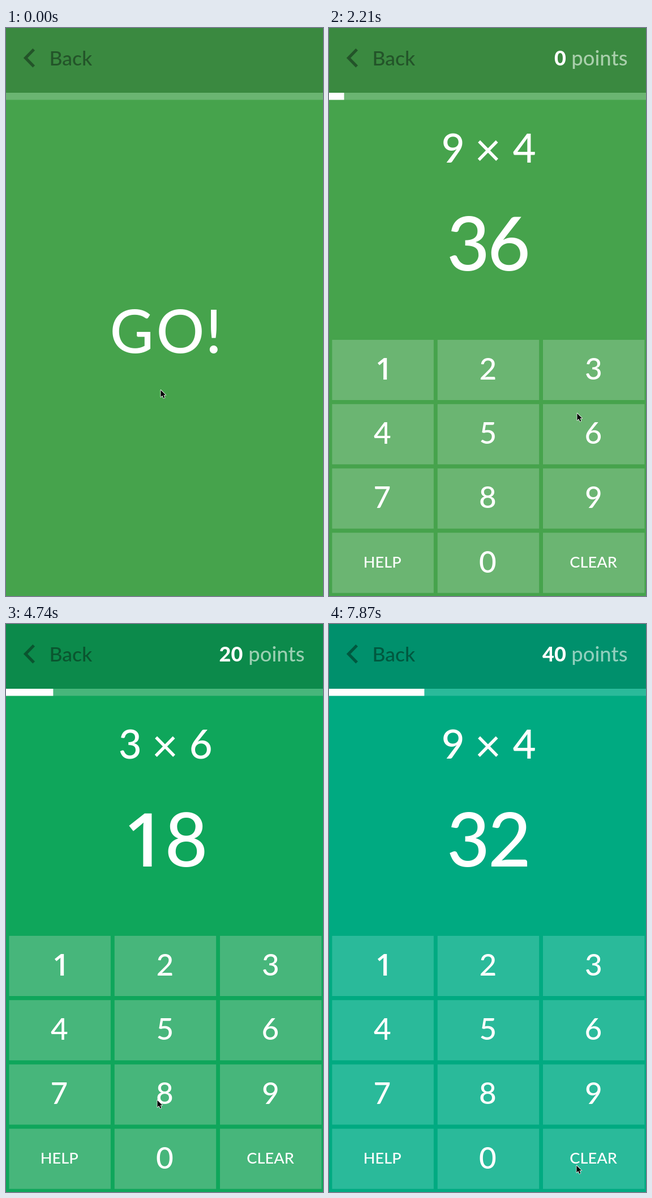
Animation, 560 px wide and 1000 px high, one loop 8000 ms. Source, as an HTML page:

```html
<!DOCTYPE html>
<html lang="en">
<head>
<meta charset="utf-8">
<title>Times tables</title>
<style>
html, body { margin: 0; width: 100%; height: 100%; overflow: hidden; }
svg { display: block; width: 100%; height: 100%; }
text { fill: #fff; white-space: pre; }
#bg { fill: var(--bg); }
#head { fill: var(--head); }
.panel { fill: var(--panel); }
#back text { fill: var(--back); }
#back path { fill: none; stroke: var(--back); stroke-width: 5.2; }
#label text { fill: var(--label); }
</style>
</head>
<body>
<svg id="stage" viewBox="0 0 560 1000" xmlns="http://www.w3.org/2000/svg">
  <rect id="bg" width="560" height="1000"/>
  <rect id="head" width="560" height="114"/>
  <rect class="panel" y="114" width="560" height="12.5"/>
  <rect id="bar" y="114" width="0" height="12.5" fill="#fff"/>
  <g id="back"><path d="M49.2 37.8L34.5 52.8 49.2 67.8"/></g>
  <g id="go"></g>
  <g id="game">
    <g id="score"></g>
    <g id="label"></g>
    <g id="question"></g>
    <g id="answer"></g>
    <g id="keys"></g>
  </g>
  <path id="cursor" d="M.4 .4V12.8L3.3 10.1 5.3 14.8 7.4 13.9 5.5 9.3H9.2Z" fill="#000" stroke="#fff" stroke-width="1.5" stroke-linejoin="round" paint-order="stroke"/>
</svg>
<script>
const LOOP = 8000;
const $ = id => document.getElementById(id);
const ctx = document.createElement('canvas').getContext('2d');

function add(parent, tag, attrs) {
  const el = document.createElementNS('http://www.w3.org/2000/svg', tag);
  for (const k in attrs) el.setAttribute(k, attrs[k]);
  parent.append(el);
  return el;
}

// The figure one comes from a family that draws it without a foot.
const face = (str, weight) => str === '1'
  ? { family: '"Open Sans", sans-serif', weight: weight + 100 }
  : { family: 'Lato, sans-serif', weight };

function measure(str, size, f) {
  ctx.font = `${f.weight} ${size}px ${f.family}`;
  const m = ctx.measureText(str);
  return { l: m.actualBoundingBoxLeft, r: m.actualBoundingBoxRight,
    a: m.actualBoundingBoxAscent, d: m.actualBoundingBoxDescent };
}

// Text whose visible ink is centred on cx.
function put(parent, str, cx, base, size, weight = 500) {
  const f = face(str, weight), m = measure(str, size, f);
  add(parent, 'text', {
    x: cx - (m.r - m.l) / 2, y: base, 'font-size': size,
    'font-weight': f.weight, 'font-family': f.family
  }).textContent = str;
}

function putTimes(parent, cx, cy, width) {
  const m = measure('×', 100, face('×', 400)), k = width / (m.r + m.l);
  put(parent, '×', cx, cy + (m.a - m.d) / 2 * k, 100 * k, 400);
}

put($('back'), 'Back', 116.3, 65.5, 35.5);
put($('label'), 'points', 478.5, 65.5, 36.4);
[['G', 221.5], ['O', 308], ['!', 367]].forEach(([c, x]) => put($('go'), c, x, 572, 106));

['1', '2', '3', '4', '5', '6', '7', '8', '9', 'HELP', '0', 'CLEAR'].forEach((name, i) => {
  const col = i % 3, row = Math.floor(i / 3), word = name.length > 1;
  add($('keys'), 'rect', {
    class: 'panel', x: 5.5 + 186.25 * col, y: 549 + 113.2 * row, width: 179.4, height: 106
  });
  put($('keys'), name, 94 + 186.5 * col + (word ? 1 : 0),
    (word ? 610.8 : 619) + 113.2 * row, word ? 27.2 : 53);
});

const rounds = [
  { at: 0, points: '0', a: '9', b: '4',
    bg: '#46a34c', head: '#3a8940', panel: '#6bb572', back: '#235429', label: '#a9cfab' },
  { at: 2360, points: '20', a: '3', b: '6',
    bg: '#0fa65b', head: '#0c8a4b', panel: '#47b67b', back: '#0a552f', label: '#9acfb1' },
  { at: 4880, points: '40', a: '9', b: '4',
    bg: '#00aa81', head: '#00906c', panel: '#2aba9a', back: '#00583f', label: '#90cfbd' }
];

const answers = [[0, ''], [1630, '3'], [2070, '36'], [2360, ''], [3840, '1'],
  [4580, '18'], [4880, ''], [6070, '3'], [6520, '32']];

const path = [[740, 273, 637], [1500, 438, 616], [1770, 438, 618], [2140, 438, 678],
  [2660, 438, 678], [3780, 134, 615], [4200, 134, 615], [4700, 267, 838],
  [4880, 267, 838], [5950, 456, 613], [6070, 456, 613], [6500, 283, 617],
  [7420, 283, 617], [7860, 437, 953]];

function cursorAt(t) {
  const i = path.findIndex(p => p[0] > t);
  if (i === 0) return path[0].slice(1);
  if (i < 0) return path[path.length - 1].slice(1);
  const [t0, x0, y0] = path[i - 1], [t1, x1, y1] = path[i];
  const u = (t - t0) / (t1 - t0), e = u * u * (3 - 2 * u);
  return [x0 + (x1 - x0) * e, y0 + (y1 - y0) * e];
}

let shownRound, shownAnswer;

function setRound(r) {
  if (r === shownRound) return;
  shownRound = r;
  for (const k of ['bg', 'head', 'panel', 'back', 'label'])
    $('stage').style.setProperty('--' + k, r[k]);
  $('score').replaceChildren();
  put($('score'), r.points, r.points.length > 1 ? 398 : 408.5, 65.5, 36, 800);
  const q = $('question');
  q.replaceChildren();
  put(q, r.a, 218.7, 237, 70.5);
  putTimes(q, 281, 215.5, 37);
  put(q, r.b, 344.2, 237, 70.5);
}

function setAnswer(str) {
  if (str === shownAnswer) return;
  shownAnswer = str;
  $('answer').replaceChildren();
  [...str].forEach((c, i) => {
    const cx = str.length > 1 ? 245 + 73.5 * i : 282;
    put($('answer'), c, c === '1' ? cx - 8 : cx, 427, 131);
  });
}

function draw(t) {
  const playing = t >= 450;
  $('go').style.display = playing ? 'none' : '';
  $('game').style.display = playing ? '' : 'none';
  setRound(rounds.findLast(r => r.at <= t));
  setAnswer(answers.findLast(a => a[0] <= t)[1]);
  const ticks = Math.max(0, Math.floor((t - 400) / 1200));
  $('bar').setAttribute('width', Math.max(0, 28.35 * ticks - 1.7));
  $('cursor').setAttribute('transform', `translate(${cursorAt(t)})`);
}

const start = performance.now();
function frame(now) {
  draw(Math.max(0, now - start) % LOOP);
  requestAnimationFrame(frame);
}
draw(0);
requestAnimationFrame(frame);
</script>
</body>
</html>
```
